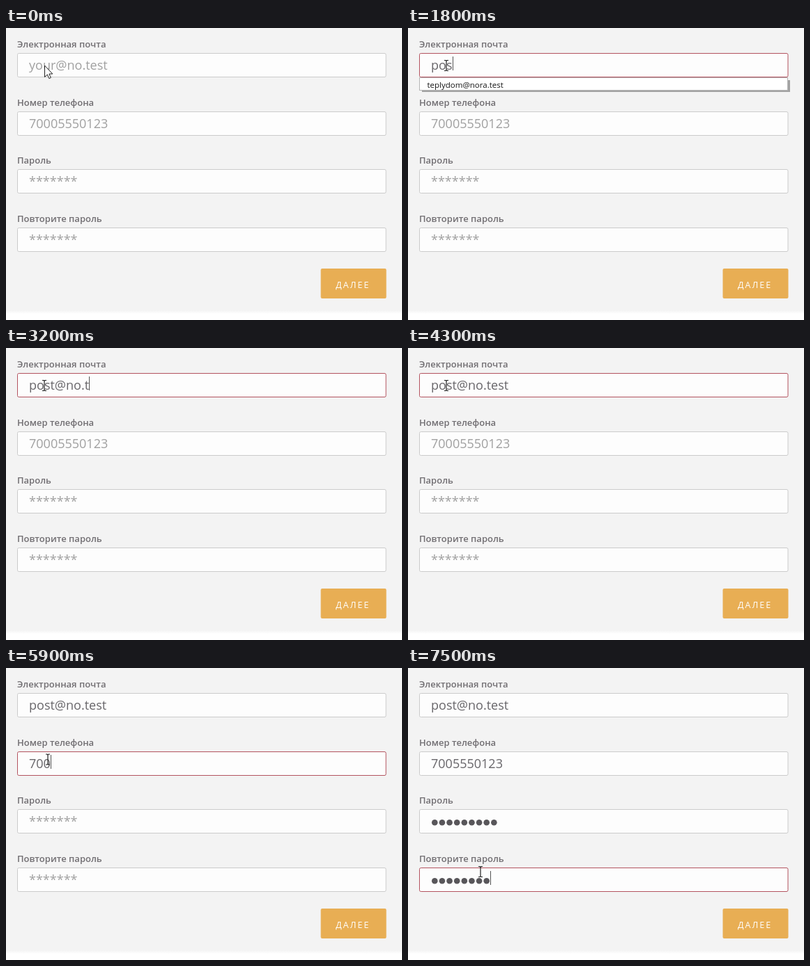
These frames come from a looping animation (568x420 px, 7600 ms). An HTML page:

```html
<!DOCTYPE html>
<html lang="ru">
<head>
<meta charset="utf-8">
<title>Форма регистрации</title>
<style>
  html, body { margin: 0; width: 100%; height: 100%; overflow: hidden; background: #fff; }
  svg { display: block; width: 568px; height: 420px; font-family: "Open Sans", "Noto Sans", sans-serif; }
  text { white-space: pre; }
  .label { font-size: 13px; font-weight: 600; fill: #716e72; }
  .value { font-size: 18px; }
  .hint { font-size: 11.5px; fill: #151515; }
  .button { font-size: 12.5px; letter-spacing: 2px; fill: #fff; }
</style>
</head>
<body>
<svg id="stage" viewBox="0 0 568 420">
  <defs>
    <linearGradient id="edge" x1="0" y1="0" x2="0" y2="1">
      <stop offset="0" stop-color="#f3f3f3"/>
      <stop offset="1" stop-color="#fff"/>
    </linearGradient>
  </defs>
  <rect width="568" height="406" fill="#f3f3f3"/>
  <rect y="406" width="568" height="5" fill="url(#edge)"/>
  <g id="fields"></g>
  <rect x="451.5" y="346" width="94" height="43" rx="2" fill="#e8ae54"/>
  <text class="button" x="473" y="373.5">ДАЛЕЕ</text>
  <g id="hint">
    <path d="M20 90.5H546.5V75" fill="none" stroke="#a2a2a2" stroke-width="3"/>
    <rect x="16.5" y="71.5" width="528" height="18" fill="#fff" stroke="#b5b5b5"/>
    <text class="hint" x="27.5" y="85.5">teplydom@nora.test</text>
  </g>
  <path id="caret" stroke="#555" fill="none"/>
  <g id="cursor">
    <path id="arrow" d="M.5 0V16.5L4.3 13L6.8 18.6L9.3 17.5L6.9 12H11.8Z" fill="#fff" stroke="#222" stroke-linejoin="round"/>
    <path id="beam" d="M-3 -7.5H-1L0 -6.5L1 -7.5H3M0 -6.5V6.5M-3 7.5H-1L0 6.5L1 7.5H3" fill="none" stroke="#222" stroke-width="1.2"/>
  </g>
</svg>
<script>
const LOOP = 7600, STEP = 100, BLINK = 530;
const TEXT_X = 33, DOT_PITCH = 10.63;
const byId = id => document.getElementById(id);

function add(parent, name, attrs, content = '') {
  const node = document.createElementNS('http://www.w3.org/2000/svg', name);
  for (const key in attrs) node.setAttribute(key, attrs[key]);
  node.textContent = content;
  return parent.appendChild(node);
}

// Keystroke times at an even pace, both ends included
const evenKeys = (from, to, count) =>
  Array.from({ length: count }, (_, i) => from + (to - from) * i / (count - 1));

const fields = [
  { label: 'Электронная почта', placeholder: 'your@no.test', text: 'post@no.test', focus: [900, 4900],
    keys: [1200, 1400, 1600, 1900, 2300, 2500, 2800, 3000, 3200, 3500, 3800, 4000] },
  { label: 'Номер телефона', placeholder: '70005550123', text: '7005550123', focus: [4900, 7000],
    keys: [5400, 5700, 5800, 6000, 6100, 6300, 6400, 6500, 6800, 6900] },
  { label: 'Пароль', placeholder: '*******', secret: true, focus: [7000, 7300],
    keys: evenKeys(7020, 7200, 9) },
  { label: 'Повторите пароль', placeholder: '*******', secret: true, focus: [7300, LOOP],
    keys: evenKeys(7310, 7500, 8) }
];

const cursorPath = [
  [0, 55, 54], [4400, 55, 54], [4900, 60, 131.5],
  [6800, 60, 131.5], [7000, 92, 216], [7300, 104, 293], [LOOP, 104, 293]
];

fields.forEach((field, i) => {
  const top = Math.round(36 + i * 83.6) + .5;
  const group = byId('fields');
  field.top = top;
  add(group, 'text', { class: 'label', x: 16, y: top - 8.5 }, field.label);
  field.box = add(group, 'rect', { x: 16.5, y: top, width: 528.5, height: 34, rx: 2, fill: '#fdfdfd' });
  field.value = add(group, 'text', { class: 'value', x: TEXT_X, y: top + 23.5 });
  field.dots = field.secret ? field.keys.map((_, n) => add(group, 'circle', {
    cx: TEXT_X + DOT_PITCH * (n + .5), cy: top + 18.7, r: 4.3, fill: '#58565a'
  })) : [];
});

function cursorAt(t) {
  const i = cursorPath.findIndex(([time]) => time > t);
  const [t0, x0, y0] = cursorPath[i - 1], [t1, x1, y1] = cursorPath[i];
  const p = (t - t0) / (t1 - t0), ease = p * p * (3 - 2 * p);
  return [x0 + (x1 - x0) * ease, y0 + (y1 - y0) * ease];
}

const show = (node, visible) => node.setAttribute('visibility', visible ? 'visible' : 'hidden');

function drawField(field, t) {
  const typed = field.keys.filter(key => key <= t);
  const count = typed.length;
  const [from, to] = field.focus;
  const focused = t >= from && t < to;

  field.box.setAttribute('stroke', focused ? '#b3535f' : '#cbcbcb');
  field.value.textContent = !count ? field.placeholder : field.secret ? '' : field.text.slice(0, count);
  field.value.setAttribute('fill', count ? '#68666a' : '#a0a0a0');
  field.dots.forEach((dot, n) => show(dot, n < count));
  if (!focused) return;

  const width = !count ? 0 : field.secret ? count * DOT_PITCH : field.value.getComputedTextLength();
  const x = Math.round(TEXT_X + width) + .5;
  byId('caret').setAttribute('d', `M${x} ${field.top + 4.5}v20`);
  const lastInput = count ? typed[count - 1] : from;
  show(byId('caret'), Math.floor((t - lastInput) / BLINK) % 2 === 0 && !(t >= 4200 && t < 4900));
}

function draw(now) {
  const t = Math.floor((now % LOOP) / STEP) * STEP;
  show(byId('caret'), false);
  fields.forEach(field => drawField(field, t));
  show(byId('hint'), t >= 1200 && t < 2300);
  show(byId('arrow'), t < 300);
  show(byId('beam'), t >= 300);
  byId('cursor').setAttribute('transform', `translate(${cursorAt(t)})`);
}

let start;
function tick(now) {
  start ??= now;
  draw(now - start);
  requestAnimationFrame(tick);
}
draw(0);
requestAnimationFrame(tick);
</script>
</body>
</html>
```
